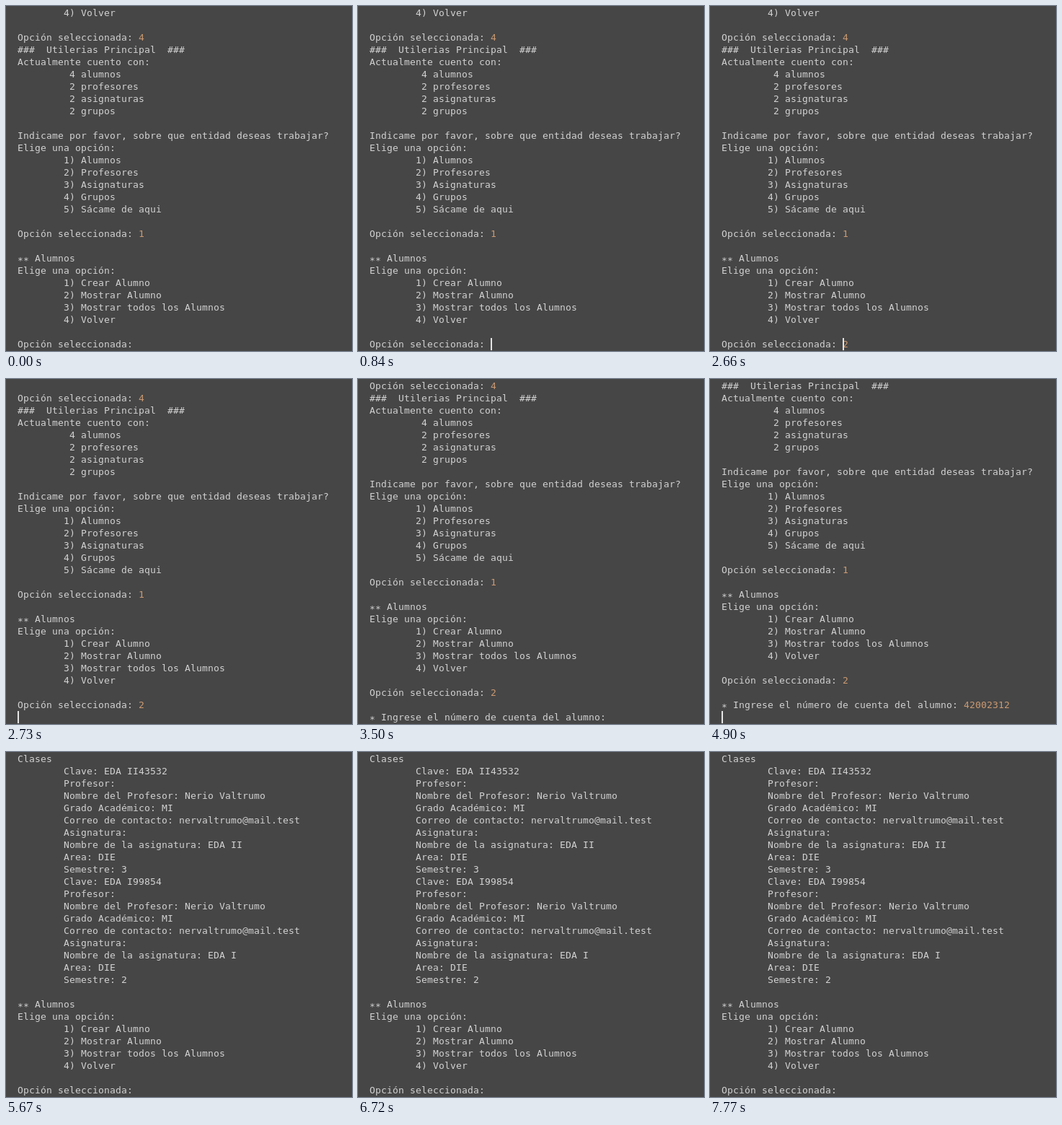
These frames come from a looping animation (480x478 px, 8.26 s). An HTML page:

```html
<!DOCTYPE html>
<html lang="es">
<head>
<meta charset="utf-8">
<title>Consola de utilerías</title>
<style>
  html, body { margin: 0; width: 100%; height: 100%; overflow: hidden; background: #464646; }
  #console { position: relative; width: 480px; height: 478px; overflow: hidden; }
  #text {
    position: absolute; left: 16px; top: 1px; margin: 0;
    font: 13px/17px "DejaVu Sans Mono", monospace;
    letter-spacing: calc(8px - 1ch);
    color: #d2d2d2; white-space: pre;
  }
  #text b { font-weight: normal; color: #cb9a72; }
  #text i { font-style: normal; position: relative; top: 3px; }
  #caret { position: absolute; top: 460px; width: 2px; height: 17px; background: #e4e4e4; }
</style>
</head>
<body>
<div id="console"><pre id="text"></pre><div id="caret"></div></div>
<script>
const LOOP = 8260, ROWS = 28, CELL = 8, MARGIN = 16;
const PROMPT = 'Opción seleccionada: ';
const ASK = '* Ingrese el número de cuenta del alumno: ';
const ACCOUNT = '42002312';

const indent = (items, width = 8) => items.map(item => ' '.repeat(width) + item);
const numbered = items => indent(items.map((item, i) => `${i + 1}) ${item}`));
// Text after a bar is user input.
const typed = (label, value) => `${label}|${value}`;

const studentMenu = [
  '', '** Alumnos', 'Elige una opción:',
  ...numbered(['Crear Alumno', 'Mostrar Alumno', 'Mostrar todos los Alumnos', 'Volver']), ''
];

const history = [
  ...indent(['4) Volver']), '',
  typed(PROMPT, 4),
  '###  Utilerias Principal  ###',
  'Actualmente cuento con:',
  ...indent(['4 alumnos', '2 profesores', '2 asignaturas', '2 grupos'], 9), '',
  'Indicame por favor, sobre que entidad deseas trabajar?',
  'Elige una opción:',
  ...numbered(['Alumnos', 'Profesores', 'Asignaturas', 'Grupos', 'Sácame de aqui']), '',
  typed(PROMPT, 1),
  ...studentMenu
];

const course = (name, key, term) => indent([
  `Clave: ${name}${key}`,
  'Profesor:',
  'Nombre del Profesor: Nerio Valtrumo',
  'Grado Académico: MI',
  'Correo de contacto: nervaltrumo@mail.test',
  'Asignatura:',
  `Nombre de la asignatura: ${name}`,
  'Area: DIE',
  `Semestre: ${term}`
]);

const chosen = [...history, typed(PROMPT, 2)];
const answered = [...chosen, '', typed(ASK, ACCOUNT)];
const report = ['Clases', ...course('EDA II', 43532, 3), ...course('EDA I', 99854, 2), ...studentMenu];

const menu = [...history, PROMPT];
const asking = [...chosen, '', ASK];
const result = [...report, PROMPT];
const menuCol = PROMPT.length, askCol = ASK.length, OFF = -1;

// [start in ms, lines, caret column]
const steps = [
  [0, menu, OFF],
  [840, menu, menuCol],
  [1330, menu, OFF],
  [1890, chosen, menuCol + 1],
  [2380, chosen, OFF],
  [2520, chosen, menuCol],
  [2730, [...chosen, ''], 0],
  [2800, [...chosen, '', ''], 0],
  [3010, asking, askCol],
  [3500, asking, OFF],
  [3990, answered, askCol + ACCOUNT.length],
  [4480, answered, OFF],
  [4620, answered, askCol],
  [4900, [...answered, ''], 0],
  [4970, [...report, ''], 0],
  [5180, result, menuCol],
  [5670, result, OFF],
  [6160, result, menuCol],
  [6720, result, OFF],
  [7210, result, menuCol],
  [7770, result, OFF]
];

const text = document.getElementById('text');
const caret = document.getElementById('caret');

const markup = line => line
  .replace(/^\*+/, '<i>$&</i>')
  .replace(/\|(.*)/, '<b>$1</b>');

let current;
function draw(now) {
  const time = now % LOOP;
  const step = steps.findLast(([start]) => start <= time);
  if (step !== current) {
    current = step;
    const [, lines, column] = step;
    text.innerHTML = lines.slice(-ROWS).map(markup).join('\n');
    caret.hidden = column === OFF;
    caret.style.left = `${MARGIN + column * CELL}px`;
  }
}

function tick() {
  draw(performance.now());
  requestAnimationFrame(tick);
}
tick();
</script>
</body>
</html>
```
